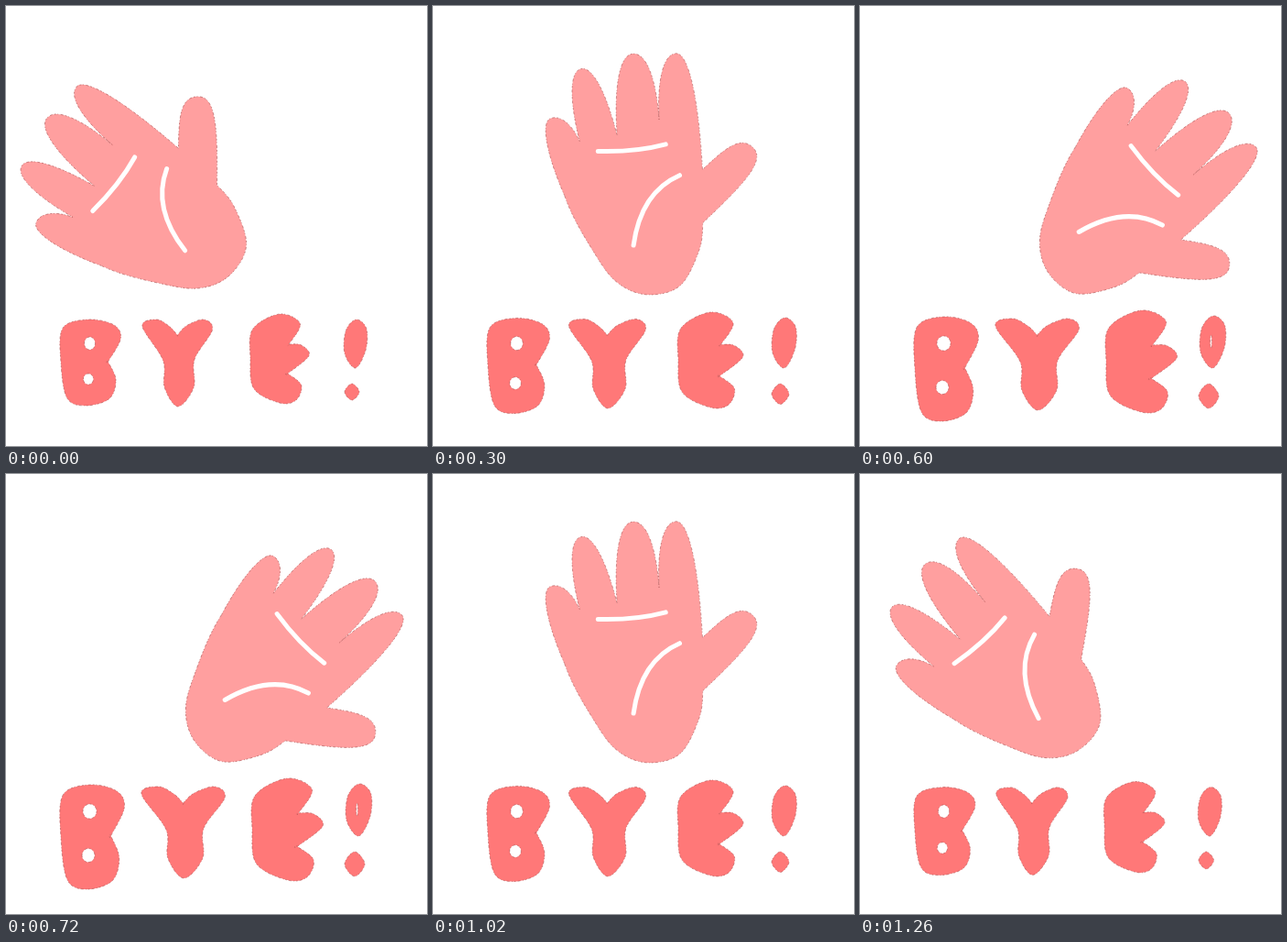
Animation, 460 px wide and 480 px high, one loop 1320 ms. Source, as an HTML page:

```html
<!DOCTYPE html>
<html lang="en">
<head>
<meta charset="utf-8">
<title>Bye!</title>
<style>
  html, body { margin: 0; height: 100%; overflow: hidden; background: #fff; }
  svg { display: block; width: 100%; height: 100%; }
  path { stroke: #a84f4f; stroke-opacity: .7; stroke-width: .8; stroke-dasharray: 2 1.5 1 2.5 3 2; }
  #palm { fill: #ff9f9f; }
  #word { fill: #ff7878; }
  #holes { fill: #fff; }
  #creases { fill: none; stroke: #fff; stroke-opacity: 1; stroke-width: 5; stroke-linecap: round; stroke-dasharray: none; }
</style>
</head>
<body>
<svg viewBox="0 0 460 480" role="img" aria-label="Bye!">
  <g id="hand"><path id="palm"/><path id="creases"/></g>
  <path id="word"/>
  <path id="holes"/>
</svg>
<script>
const STEP = 60, LAST = 11;
const WRIST = [236, 270];

// Upright hand: each finger's tip, the valley after it and its roundness
const fingers = [
  { tip: [131, 122], valley: [163, 147], round: 11 },
  { tip: [165, 68], valley: [204, 141], round: 13 },
  { tip: [222, 52], valley: [250, 124], round: 15 },
  { tip: [269, 52], valley: [297, 179], round: 14 },
  { tip: [353, 156], valley: [297, 237], round: 20 }
];
const heel = [[293, 266], [272, 305], [237, 315], [205, 303], [180, 272], [146, 206]];
const creases = [
  [[257, 151], [222, 157], [183, 158]],
  [[272, 185], [238, 213], [221, 261]]
];

// Outlines in percent of a box [x, y, w, h] that swells by grow; doubled points are corners
const letters = [
  { shape: [[3, 10], [45, 0], [87, 6], [99, 22], [78, 49], [78, 49], [91, 70], [80, 92], [40, 100], [10, 91], [0, 50]],
    box: [60, 342, 66, 94], grow: [0, -3, 4, 20] },
  { shape: [[0, 8], [20, 0], [38, 8], [49, 18], [49, 18], [62, 7], [86, 0], [98, 12], [73, 46], [72, 78], [50, 100], [31, 78], [29, 47]],
    box: [149, 342, 78, 95], grow: [-1, -1, 15, 5] },
  { shape: [[4, 17], [50, 0], [85, 11], [66, 34], [66, 34], [87, 35], [100, 47], [64, 67], [64, 67], [87, 80], [78, 97], [50, 100], [6, 84], [0, 50]],
    box: [267, 336, 64, 97], grow: [2, -4, 13, 14] },
  { shape: [[9, 23], [52, 0], [95, 18], [93, 62], [50, 100], [4, 70]],
    box: [369, 342, 26, 53], grow: [2, -4, 3, 4] },
  { shape: [[0, 50], [50, 0], [100, 50], [50, 100]],
    box: [370, 412, 16, 18], grow: [0, 0, 6, 9] }
];

const $ = id => document.getElementById(id);
const fmt = (...nums) => nums.map(n => n.toFixed(2)).join(' ');

// Spline piece from b to c with neighbours a and d
const spline = (a, b, c, d) => 'C' + fmt(
  b[0] + (c[0] - a[0]) / 6, b[1] + (c[1] - a[1]) / 6,
  c[0] - (d[0] - b[0]) / 6, c[1] - (d[1] - b[1]) / 6, ...c);

function blob(pts) {
  const at = i => pts[(i + pts.length) % pts.length];
  return 'M' + fmt(...pts[0]) +
    pts.map((p, i) => spline(at(i - 1), p, at(i + 1), at(i + 2))).join('') + 'Z';
}

const oval = (x, y, rx, ry) =>
  `M${fmt(x - rx, y)}a${fmt(rx, ry)} 0 1 1 ${fmt(2 * rx, 0)}a${fmt(rx, ry)} 0 1 1 ${fmt(-2 * rx, 0)}Z`;

// Curve through the middle point of three
const arc = ([a, m, b]) => 'M' + fmt(...a) + 'Q' +
  fmt(2 * m[0] - (a[0] + b[0]) / 2, 2 * m[1] - (a[1] + b[1]) / 2, ...b);

// Rounded finger from base a over the tip to base b
function fingerPath(a, tip, b, w) {
  const dx = tip[0] - (a[0] + b[0]) / 2, dy = tip[1] - (a[1] + b[1]) / 2;
  const len = Math.hypot(dx, dy), ux = dx / len, uy = dy / len;
  const side = p => {
    const s = .6 * ((tip[0] - p[0]) * ux + (tip[1] - p[1]) * uy);
    return [p[0] + ux * s, p[1] + uy * s];
  };
  return 'C' + fmt(...side(a), tip[0] + uy * w, tip[1] - ux * w, ...tip) +
    'C' + fmt(tip[0] - uy * w, tip[1] + ux * w, ...side(b), ...b);
}

function handPath() {
  let base = heel[heel.length - 1], d = 'M' + fmt(...base);
  for (const { tip, valley, round } of fingers) {
    d += fingerPath(base, tip, valley, round);
    base = valley;
  }
  const run = [base, base, ...heel, fingers[0].tip];
  for (let i = 0; i < heel.length; i++) d += spline(...run.slice(i, i + 4));
  return d + 'Z';
}

// Steady turn with a short hitch while the wrist shifts over to the other side
function handTransform(k) {
  const u = k - 4.55;
  const angle = 9.8 * k - 46.5 - 8 * u * Math.exp(-u * u);
  const x = 227 + 14.5 * Math.tanh(1.2 * u);
  const y = 270 - 7 * ((k - 5.3) / 5) ** 2;
  return `translate(${fmt(x, y)}) rotate(${fmt(angle)}) translate(${fmt(-WRIST[0], -WRIST[1])})`;
}

function letterPath({ shape, box, grow }, g) {
  const [x, y, w, h] = box.map((v, i) => v + grow[i] * g);
  return blob(shape.map(([px, py]) => [x + w * px / 100, y + h * py / 100]));
}

function holePath(g) {
  const slit = Math.max(0, g - .5);
  return oval(91.5, 368, 6 + 1.5 * g, 7 + g) +
    oval(90, 407 + 9 * g, 5.5 + 1.5 * g, 6 + 1.5 * g) +
    (slit ? oval(383.5, 366, .9, 14 * slit) : '');
}

function draw(time) {
  const step = Math.floor(time / STEP) % (2 * LAST);
  const k = Math.min(step, 2 * LAST - step), g = k / 10;
  $('hand').setAttribute('transform', handTransform(k));
  $('word').setAttribute('d', letters.map(l => letterPath(l, g)).join(''));
  $('holes').setAttribute('d', holePath(g));
}

$('palm').setAttribute('d', handPath());
$('creases').setAttribute('d', creases.map(arc).join(''));

const start = performance.now();
(function tick() {
  draw(performance.now() - start);
  requestAnimationFrame(tick);
})();
</script>
</body>
</html>
```
